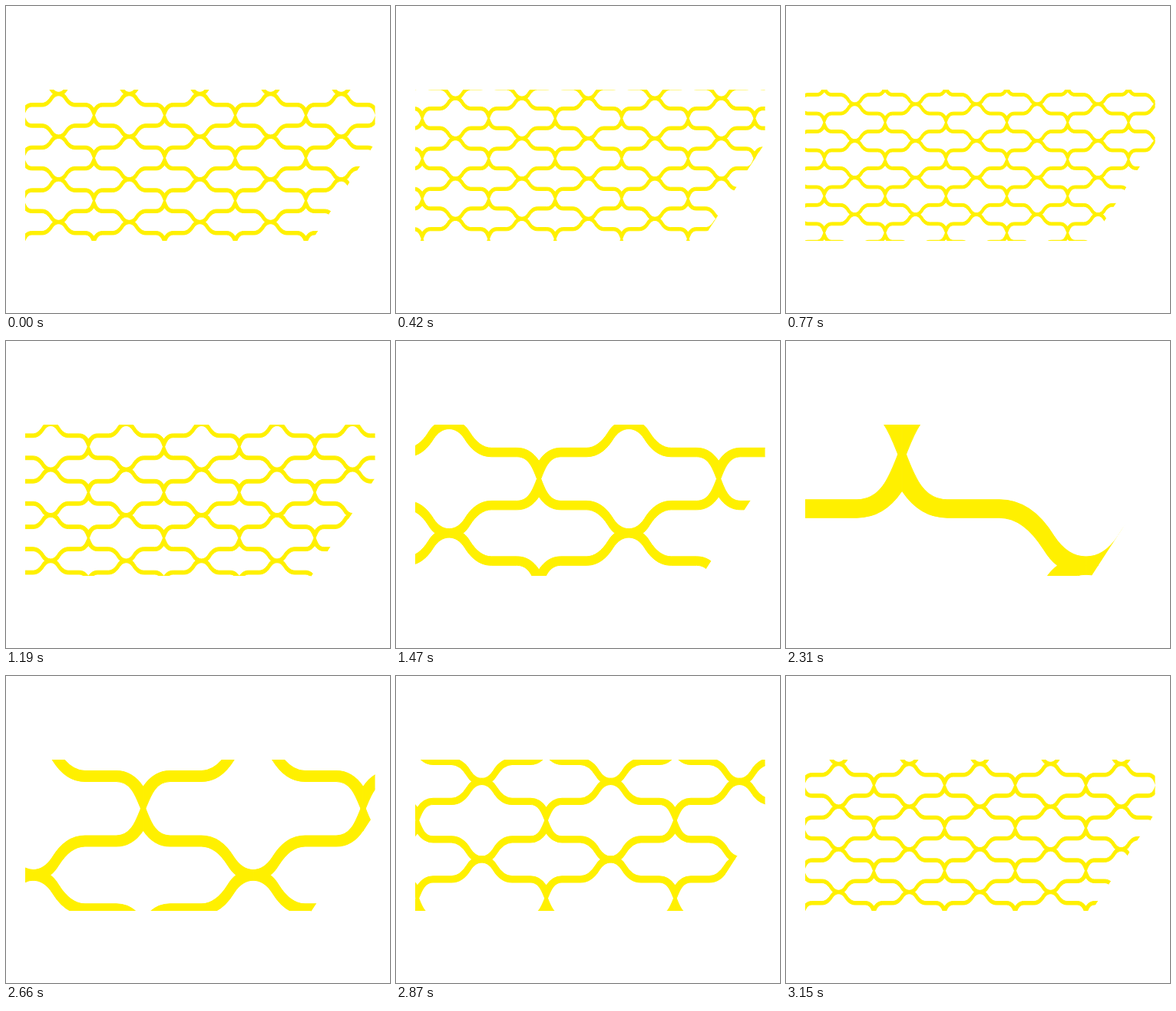
An HTML page with a canvas that plays this animation: 500x400 px, repeating every 4200 ms.

```html
<!DOCTYPE html>
<html lang="en">
<head>
<meta charset="utf-8">
<title>Scaling lattice</title>
<style>
  html, body { margin: 0; width: 100%; height: 100%; overflow: hidden; background: #fff; }
  canvas { display: block; }
</style>
</head>
<body>
<canvas id="stage" width="500" height="400"></canvas>
<script>
const ctx = document.getElementById('stage').getContext('2d');
const YELLOW = '#fff000';
const STEP = 70, LOOP = 4200, SEGMENT = 1050;

// Horizontal period of the lattice at the start of each segment
const PERIODS = [92, 76.5, 524, 92, 92];

// Fixed point of the zoom, and its offset from a pinch as a share of the period
const CENTER = { x: 219.6, y: 210 };
const ANCHOR = { x: 0.143, y: 0.13 };

// Quarter tile: pinch at the origin, joint at the far corner
const TILE_W = 204, TILE_H = 123.4;
const quarter = new Path2D(`
  M0 0 L4.5 0
  C14 24 23 50.2 50 50.2
  L108 50.2
  C137 50.2 156 70 168.5 90.5
  C178 105 190 113.5 204 113.5
  L204 123.4 L172.5 123.4
  C165 118 161 112 157 105.5
  C143 83 126 70.2 108 70.2
  L50 70.2
  C29 70.2 13 60 0 40.5 Z`);

const windowShape = new Path2D('M25 109 H480.5 V178.5 L397.5 306.5 L396 306 H25 Z');

function periodAt(time) {
  const i = Math.floor(time / SEGMENT);
  const u = time / SEGMENT - i;
  const eased = u * u * (3 - 2 * u);
  return PERIODS[i] + (PERIODS[i + 1] - PERIODS[i]) * eased;
}

function drawQuarter(x, y, sx, sy) {
  ctx.setTransform(sx, 0, 0, sy, x, y);
  ctx.fill(quarter);
  ctx.stroke(quarter);
}

// Each tile is centred on a pinch and has joints at its four corners
function drawLattice(period) {
  const scale = period / (2 * TILE_W);
  const rowHeight = 2 * TILE_H * scale;
  const x0 = CENTER.x - ANCHOR.x * period;
  const y0 = CENTER.y - ANCHOR.y * period;
  const cols = Math.ceil(300 / period) + 1;
  const rows = Math.ceil(130 / rowHeight) + 1;

  ctx.lineWidth = 1 / scale;
  for (let row = -rows; row <= rows; row++) {
    for (let col = -cols; col <= cols; col++) {
      const x = x0 + col * period;
      const y = y0 + row * rowHeight;
      for (const sx of [-scale, scale]) {
        for (const sy of [-scale, scale]) drawQuarter(x, y, sx, sy);
      }
    }
  }
}

function render() {
  const time = Math.floor((performance.now() % LOOP) / STEP) * STEP;
  ctx.setTransform(1, 0, 0, 1, 0, 0);
  ctx.fillStyle = '#fff';
  ctx.fillRect(0, 0, 500, 400);
  ctx.save();
  ctx.clip(windowShape);
  ctx.fillStyle = ctx.strokeStyle = YELLOW;
  ctx.lineJoin = 'round';
  drawLattice(periodAt(time));
  ctx.restore();
  requestAnimationFrame(render);
}

render();
</script>
</body>
</html>
```
